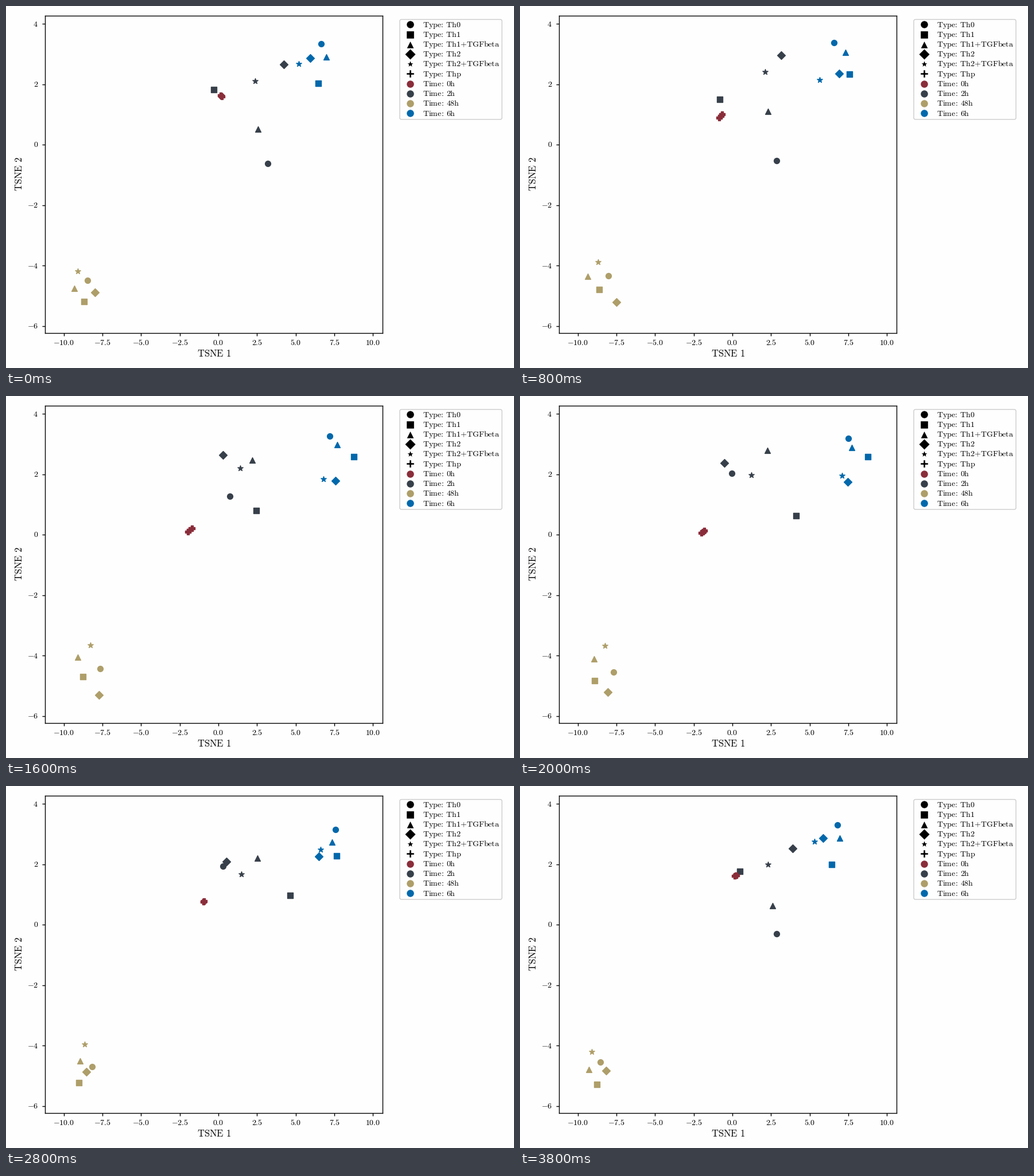
These frames come from a looping animation (885 px wide and 632 px high, 4000 ms). A matplotlib script:

```python
import numpy as np
import matplotlib.pyplot as plt
from matplotlib.animation import FuncAnimation
from matplotlib.patches import FancyBboxPatch

W, H, DPI = 885, 632, 100
FRAMES, INTERVAL = 20, 200
BG = "#fefefe"
RED, SLATE, TAN, BLUE = "#8a2d3a", "#37404a", "#ae9e69", "#0068ab"

plt.rcParams.update({
    "mathtext.fontset": "cm",
    "axes.linewidth": 1.0,
    "xtick.major.width": 1.0,
    "ytick.major.width": 1.0,
})

# Plot box and data-to-pixel mapping
LEFT, RIGHT, TOP, BOTTOM = 68, 656, 17, 571
X0, XS = 370, 26.94
Y0, YS = 242, -52.75

# Each point runs on an ellipse: (centre, cos, sin) for x, then for y, in pixels
TRACKS = {
    SLATE: {
        "o": (412.1, 43.4, 22.1, 205.2, 70.1, 45.8),
        "s": (421.5, -59.7, -57.9, 177.2, -31.5, -4.6),
        "^": (435.0, 3.7, -4.3, 154.9, 60.2, 10.7),
        "D": (419.8, 63.8, 16.4, 109.4, -7.9, -21.7),
        "*": (418.4, 15.3, 4.1, 134.5, -3.5, -19.3),
    },
    TAN: {
        "o": (152.1, -10.4, 5.6, 480.6, -1.5, -9.8),
        "s": (132.9, 2.7, 4.9, 506.6, 9.6, -15.5),
        "^": (123.6, -5.0, -4.0, 476.0, 17.0, -10.1),
        "D": (153.7, 0.9, 14.6, 508.2, -8.4, 12.0),
        "*": (136.5, -11.1, 3.3, 449.3, 13.5, -6.5),
    },
    BLUE: {
        "o": (560.6, -11.5, -10.7, 69.9, -3.8, -5.3),
        "s": (575.2, -31.1, 8.9, 120.9, 14.5, -6.2),
        "^": (567.6, -10.1, 2.8, 89.5, -0.9, -9.1),
        "D": (550.5, -20.1, 12.4, 120.4, -29.1, 6.6),
        "*": (535.2, -25.4, -5.2, 119.9, -19.3, 15.4),
    },
}
RED_MID = np.array([347.0, 28.35, -6.4, 196.9, -39.9, 8.0])
RED_GAP = np.array([-0.8, 1.74, -2.07, 1.2, -0.68, 1.88])

fig = plt.figure(figsize=(W / DPI, H / DPI), dpi=DPI, facecolor=BG)

ax = fig.add_axes([LEFT / W, 1 - BOTTOM / H, (RIGHT - LEFT) / W, (BOTTOM - TOP) / H])
ax.set_facecolor(BG)
ax.set_xlim((LEFT - X0) / XS, (RIGHT - X0) / XS)
ax.set_ylim((BOTTOM - Y0) / YS, (TOP - Y0) / YS)
xticks, yticks = np.arange(-10, 10.1, 2.5), np.arange(-6, 5, 2)
ax.set_xticks(xticks, [])
ax.set_yticks(yticks, [])

# Pixel-space layer for text, legend and markers
top = fig.add_axes([0, 0, 1, 1])
top.set_xlim(0, W)
top.set_ylim(H, 0)
top.axis("off")


def label(x, y, s, size=10, **kw):
    top.text(x, y, rf"$\mathrm{{{s}}}$", size=size, va="baseline", **kw)


def point(shape, color):
    return top.scatter([0], [0], s=50, marker=shape, color=color)


for v in xticks:
    label(X0 + XS * v, 592.3, f"{v:.1f}", ha="center")
for v in yticks:
    label(56, Y0 + YS * v + 4.5, f"{v:d}", ha="right")
label(362.7, 612.3, r"TSNE\ 1", 12, ha="center")
label(28.3, 293.5, r"TSNE\ 2", 12, ha="center", rotation=90,
      rotation_mode="anchor")

top.add_patch(FancyBboxPatch(
    (686, 23.5), 178, 174.5, boxstyle="round,pad=0,rounding_size=2.8",
    fc=BG, ec="0.8", lw=1))

LEGEND = [
    ("Type", "Th0", "o", "black"),
    ("Type", "Th1", "s", "black"),
    ("Type", "Th1{+}TGFbeta", "^", "black"),
    ("Type", "Th2", "D", "black"),
    ("Type", "Th2{+}TGFbeta", "*", "black"),
    ("Type", "Thp", "P", "black"),
    ("Time", "0h", "o", RED),
    ("Time", "2h", "o", SLATE),
    ("Time", "48h", "o", TAN),
    ("Time", "6h", "o", BLUE),
]
for i, (kind, name, shape, color) in enumerate(LEGEND):
    y = 32.3 + 17.2 * i
    top.plot([704], [y], ls="none", marker=shape, ms=10, mfc=color, mec=BG)
    label(726, y + 4.4, rf"{kind}\!:\:{name}", ha="left")

points = [(point(shape, color), np.array(track))
          for color, group in TRACKS.items() for shape, track in group.items()]
points += [(point("P", RED), RED_MID + k * RED_GAP) for k in (-1, 0, 1)]

# Keep the pixel mapping fixed after adding artists
top.set_xlim(0, W)
top.set_ylim(H, 0)


def draw(i):
    a = 2 * np.pi * i / FRAMES
    basis = np.array([1, np.cos(a), np.sin(a)])
    for dot, track in points:
        dot.set_offsets([track[:3] @ basis, track[3:] @ basis])
    return [dot for dot, _ in points]


anim = FuncAnimation(fig, draw, frames=FRAMES, interval=INTERVAL,
                     repeat=True, repeat_delay=0)
plt.show()
```
